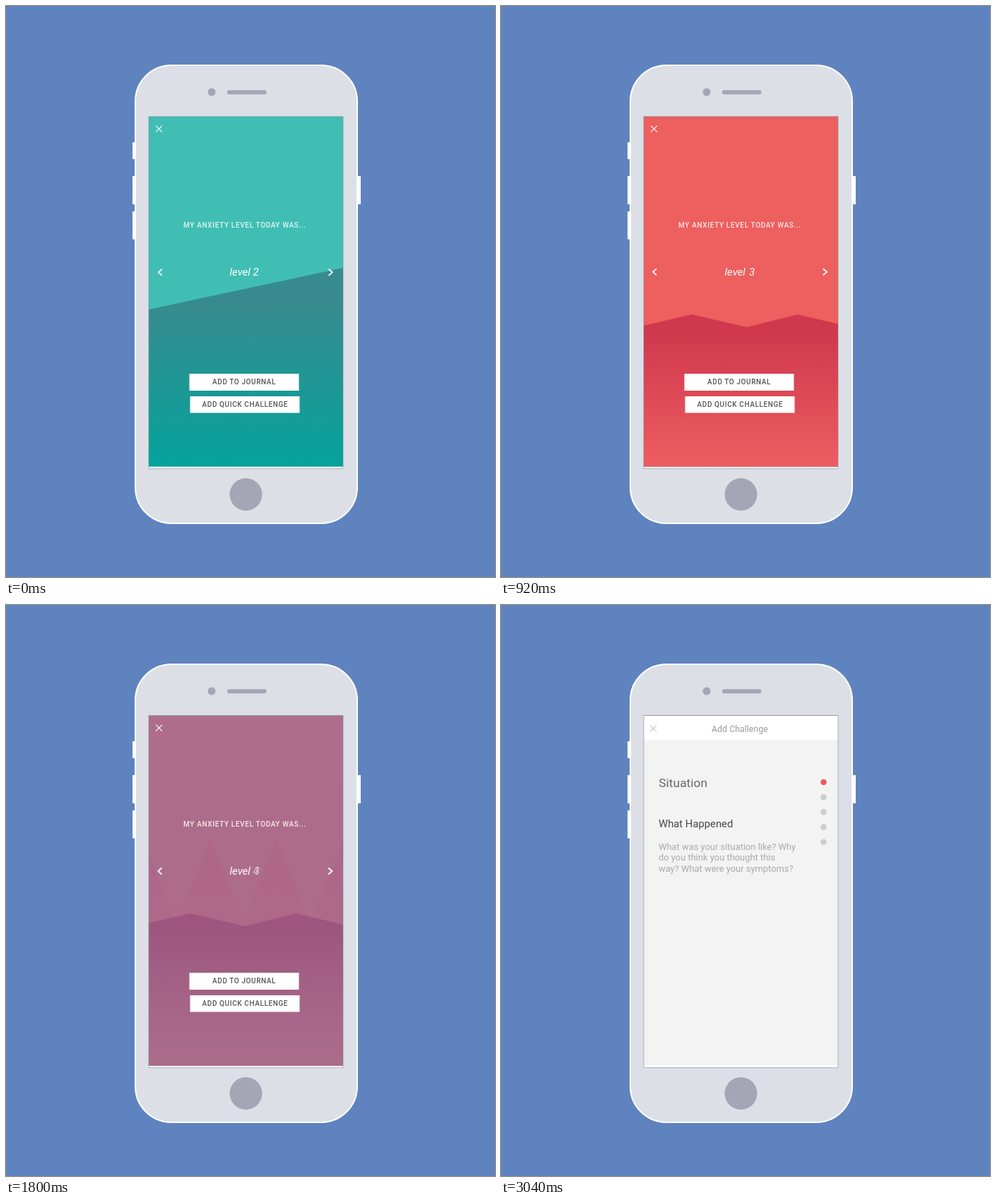
An HTML page that plays this animation: 692 px wide and 809 px high, repeating every 3560 ms.

```html
<!DOCTYPE html>
<html lang="en">
<head>
<meta charset="utf-8">
<title>Anxiety level check-in</title>
<style>
  html, body { margin: 0; width: 100%; height: 100%; overflow: hidden; background: #5f83be; }
  svg { display: block; width: 692px; height: 809px; font-family: Roboto, "Open Sans", sans-serif; }
  .caps { font-size: 10px; font-weight: 500; letter-spacing: .6px; }
  .level { font-size: 15px; font-style: italic; fill: #fff; }
  .line { fill: none; stroke: #fff; }
  .note { font-size: 12.9px; fill: #a9a9a9; }
</style>
</head>
<body>
<svg viewBox="0 0 692 809">
  <defs>
    <clipPath id="screen"><rect x="202" y="156.5" width="275" height="499"/></clipPath>
    <clipPath id="view"><rect x="202" y="156.5" width="275" height="496"/></clipPath>
    <linearGradient id="teal" gradientUnits="userSpaceOnUse" x1="0" y1="425" x2="0" y2="645">
      <stop stop-color="#378b8f"/><stop offset="1" stop-color="#06a29b"/>
    </linearGradient>
    <linearGradient id="red" gradientUnits="userSpaceOnUse" x1="0" y1="460" x2="0" y2="645">
      <stop stop-color="#cf384d"/><stop offset="1" stop-color="#ec5c60"/>
    </linearGradient>
    <linearGradient id="violet" gradientUnits="userSpaceOnUse" x1="0" y1="400" x2="0" y2="625">
      <stop stop-color="#6b71b5"/><stop offset="1" stop-color="#667ebb"/>
    </linearGradient>
  </defs>

  <rect width="692" height="809" fill="#5f83be"/>
  <path fill="#fff" d="M179 193h6v24h-6z M179 241h6v40h-6z M179 291h6v39.500h-6z M497 241h5v40h-5z"/>
  <rect x="183" y="84" width="314" height="649" rx="51" fill="#dcdfe6" stroke="#fff" stroke-width="2"/>
  <g fill="#a4a6b5">
    <circle cx="291" cy="122" r="5.500"/>
    <rect x="313" y="119.300" width="55.500" height="6" rx="2.500"/>
    <circle cx="339.500" cy="692" r="23"/>
  </g>

  <g clip-path="url(#screen)">
    <rect x="202" y="156" width="275" height="500" fill="#fff"/>
    <g clip-path="url(#view)">
      <g id="levels"></g>
      <path class="line" stroke-width="1.200" d="M212 169.700l9 9m0-9l-9 9"/>
      <text class="caps" x="251" y="314.300" fill="#fff" fill-opacity=".85" style="letter-spacing:.65px">MY ANXIETY LEVEL TODAY WAS...</text>
      <path fill="#fff" d="M259.500 521h155v24h-155z M260.500 553h155v23.500h-155z"/>
      <g class="caps" fill="#555">
        <text x="292" y="536.300">ADD TO JOURNAL</text>
        <text x="277.500" y="568.300">ADD QUICK CHALLENGE</text>
      </g>
    </g>
    <g id="sheet">
      <rect x="202" y="157" width="275" height="499" fill="#fff"/>
      <rect x="202" y="191.500" width="275" height="460.500" fill="#f3f3f3"/>
      <path class="line" style="stroke:#aaa" d="M211 170.500l9 9m0-9l-9 9"/>
      <text x="298" y="180.300" font-size="12.400" fill="#9b9b9b">Add Challenge</text>
      <text x="223.300" y="257.500" font-size="17.400" fill="#686868">Situation</text>
      <text x="223" y="314.800" font-size="14.800" fill="#484848">What Happened</text>
      <g class="note">
        <text x="223" y="347">What was your situation like? Why</text>
        <text x="223" y="362.300">do you think you thought this</text>
        <text x="223" y="377.700">way? What were your symptoms?</text>
      </g>
      <g id="dots"></g>
    </g>
  </g>
  <rect x="202" y="156.500" width="275" height="499" fill="none" stroke="#7d8290" stroke-opacity=".7" stroke-width=".8"/>
</svg>
<script>
const LOOP = 3560, STEP = 40, PIVOT = 404;
const $ = id => document.getElementById(id);

const levels = [
  { n: 2, bg: '#40beb4', fill: 'teal', label: 316.5, dx: 0, dy: 0,
    points: '195,431.5 484,369.5' },
  { n: 3, bg: '#ee5f5f', fill: 'red', label: 316.5, dx: -.7, dy: -.5,
    points: '120,437 195,454.5 270,437 348,455 420,437 496,455 570,437' },
  { n: 4, bg: '#667ebb', fill: 'violet', label: 316.5, dx: 0, dy: 0,
    points: '193,265 240.5,489 289.5,265 335.5,489 383,265 430,489 479,265' }
];

$('levels').innerHTML = levels.map(v => {
  const gap = v.n === 3 ? 1.5 : 0;
  return `<g id="level${v.n}">
    <rect x="202" y="156" width="275" height="500" fill="${v.bg}"/>
    <polygon id="hill${v.n}" points="${v.points} 600,1400 100,1400" fill="url(#${v.fill})"/>
    <text class="level" x="${v.label}" y="382.300">level <tspan dx="${gap}">${v.n}</tspan></text>
    <path class="line" stroke-width="1.800" transform="translate(${v.dx} ${v.dy})"
      d="M220.800 372.700l-5 4.600 5 4.600M456.500 372.700l5.300 4.600-5.300 4.600"/>
  </g>`;
}).join('');

$('dots').innerHTML = [0, 1, 2, 3, 4].map(i =>
  `<circle cx="456.500" cy="${251 + i * 21.2}" r="4.300" fill="${i ? '#cdcdcd' : '#f0595b'}"/>`).join('');

const span = (t, a, b) => Math.min(1, Math.max(0, (t - a) / (b - a)));
const ease = p => (1 - Math.cos(Math.PI * p)) / 2;
const stretch = (id, s) =>
  $(id).setAttribute('transform', `translate(0 ${PIVOT * (1 - s)}) scale(1 ${s})`);

function draw(time) {
  const t = Math.floor((time % LOOP) / STEP) * STEP;

  // Each level fades in over the previous one
  $('level3').setAttribute('opacity', ease(span(t, 530, 820)));
  $('level4').setAttribute('opacity', ease(span(t, 1650, 1960)));

  stretch('hill2', 1 + .86 * ease(span(t, 0, 560)));
  $('hill3').setAttribute('transform', `translate(${-8 * (t - 920) / 720} 0)`);
  stretch('hill4', 1.065 - .535 * ease(Math.min(1, Math.abs(t - 2372) / 570)));

  const rise = ease(span(t, 2710, 3040));
  $('sheet').setAttribute('transform', `translate(0 ${499 * (1 - rise)})`);
}

const start = performance.now();
function tick() {
  draw(performance.now() - start);
  requestAnimationFrame(tick);
}
tick();
</script>
</body>
</html>
```
